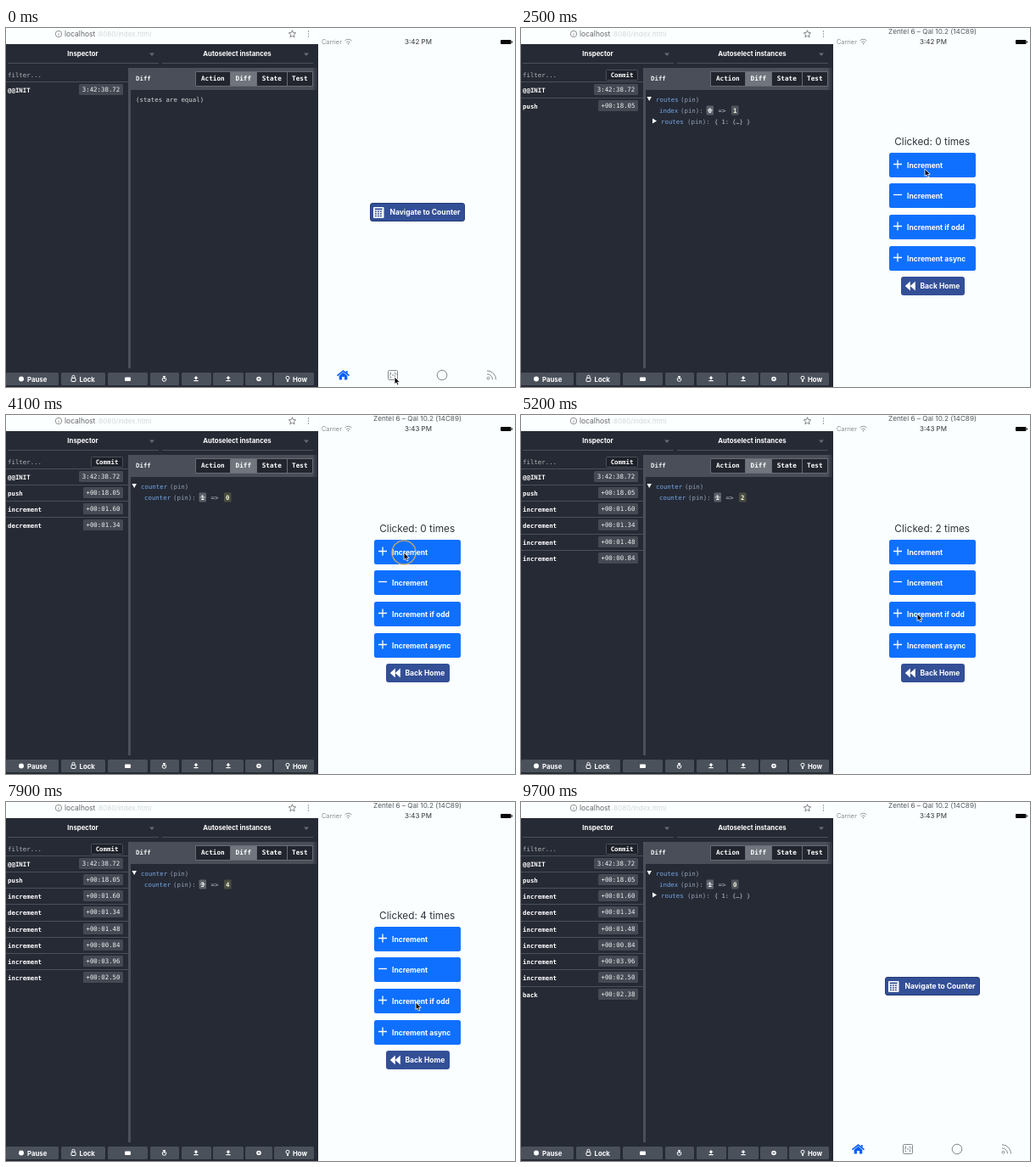
An HTML page for the animation above (9800 ms loop, 600 by 423 pixels).

```html
<!DOCTYPE html>
<html lang="en">
<head>
<meta charset="utf-8">
<title>Counter demo</title>
<style>
html, body { margin: 0; width: 100%; height: 100%; overflow: hidden; background: #fafeff; }
svg { display: block; width: 600px; height: 423px; }
text { white-space: pre; }
.mono { font-family: "DejaVu Sans Mono", monospace; font-size: 7.4px; }
.ui { font-family: Inter, sans-serif; font-size: 8px; }
.b { font-weight: 700; }
.s { font-weight: 700; font-size: 7.8px; }
</style>
</head>
<body>
<svg id="stage" viewBox="0 0 600 423"></svg>
<script>
const LOOP = 9800, STEP = 100, SLIDE = 300;
const WHITE = '#fff', DARK = '#262a34', LINE = '#4a4f59', CHIP = '#444953', BLUE = '#0f70ff', NAVY = '#334f96';

// time, label, stamp
const actions = [
  [0, '@@INIT', '3:42:38.72'],
  [2000, 'push', '+00:18.05'],
  [2800, 'increment', '+00:01.60'],
  [3500, 'decrement', '+00:01.34'],
  [4200, 'increment', '+00:01.48'],
  [4600, 'increment', '+00:00.84'],
  [6600, 'increment', '+00:03.96'],
  [7800, 'increment', '+00:02.50'],
  [9000, 'back', '+00:02.38']
];
const clicks = [1900, 2700, 3400, 4100, 4500, 5300, 6100, 7700, 8900];
const path = [
  [0, 458, 411], [300, 458, 411], [900, 398, 408], [1300, 398, 408], [1500, 406, 400],
  [1850, 480, 216], [2000, 480, 216], [2400, 476, 166], [2800, 476, 166],
  [3300, 468, 197], [3500, 468, 197], [3900, 469, 162], [4700, 469, 162],
  [5100, 467, 234], [5500, 467, 234], [5950, 480, 270], [6800, 480, 270],
  [7400, 483, 236], [8100, 483, 236], [8700, 484, 303], [9050, 484, 303], [9600, 470, 430]
];

const rect = (x, y, w, h, fill, r = 0, extra = '') =>
  `<rect x="${x}" y="${y}" width="${w}" height="${h}" rx="${r}" fill="${fill}" ${extra}/>`;
const text = (x, y, s, cls, fill = WHITE, extra = '') =>
  `<text x="${x}" y="${y}" class="${cls}" fill="${fill}" ${extra}>${s}</text>`;
const shape = (d, fill, extra = '') => `<path d="${d}" fill="${fill}" ${extra}/>`;
const stroke = (d, color, w = 1) => shape(d, 'none', `stroke="${color}" stroke-width="${w}"`);
const disc = (x, y, r, fill, extra = '') => `<circle cx="${x}" cy="${y}" r="${r}" fill="${fill}" ${extra}/>`;
const MID = 'text-anchor="middle"';

function footer() {
  const spans = [[0, 62], [65, 117], [120, 167], [170, 204], [207, 242], [244, 280], [282, 314], [316, 363]];
  const arrow = x => shape(`M${x} 410l2.6 2.8h-1.7v1.4h-1.8v-1.4h-1.7z`, WHITE) + rect(x - 2.6, 415, 5.2, 1.2, WHITE);
  return spans.map(([a, b]) => rect(a, 406, b - a, 15, '#4a515b', 1.5)).join('') +
    disc(18, 413.5, 3, WHITE) + text(25, 416.5, 'Pause', 'ui s') +
    rect(77, 412.5, 5, 4, 'none', 0.5, 'stroke="#fff"') + stroke('M78 412v-1.2a1.5 1.5 0 0 1 3 0v1.2', WHITE) +
    text(86.5, 416.5, 'Lock', 'ui s') +
    rect(140, 411.5, 7, 4.5, WHITE, 1) +
    disc(186.5, 414, 2.3, 'none', 'stroke="#fff"') + stroke('M185 410.5h3M186.5 410.5v3.5', WHITE) +
    arrow(224) + arrow(262) +
    disc(298, 413.5, 2.8, WHITE) + rect(296.7, 413, 2.6, 1, '#4a515b') +
    disc(332, 412.3, 2, 'none', 'stroke="#fff"') + rect(331, 414.5, 2, 2.5, WHITE) +
    text(338, 416.5, 'How', 'ui s');
}

function inspector() {
  const tabs = [['Action', 223, 264], ['Diff', 264, 295], ['State', 295, 331], ['Test', 331, 361]];
  const select = (x, label) =>
    text(x + 88.5, 33.3, label, 'ui s', WHITE, MID) + rect(x, 41, 178, 1, LINE) +
    shape(`M${x + 167} 29.5h6l-3 3.5z`, '#666b74');
  return '<linearGradient id="fade"><stop stop-color="#494e58"/><stop offset="1" stop-color="#2b2f39"/></linearGradient>' +
    rect(0, 0, 368, 19, '#fbffff') + rect(0, 19, 368, 404, DARK) +
    disc(62, 7, 3.7, 'none', 'stroke="#777" stroke-width=".8"') + rect(61.6, 6.2, 0.8, 2.8, '#888') +
    text(69, 10, 'localhost', 'ui', '#666', 'style="font-size:8.5px"') +
    text(107, 10, ':8080/index.html', 'ui', '#d3d7d9') +
    shape('M337.5 2.7l1.2 2.8 3 .3-2.3 2 .7 3-2.6-1.6-2.6 1.6.7-3-2.3-2 3-.3z', 'none', 'stroke="#555" stroke-width=".7"') +
    [4, 7, 10].map(y => disc(356.5, y, 0.7, '#777')).join('') +
    select(2, 'Inspector') + select(184, 'Autoselect instances') +
    text(2, 57.5, 'filter...', 'mono', '#b2b5b9') + rect(0, 63, 144, 1, LINE) +
    rect(147, 47, 214, 26, '#494e58') + rect(361, 47, 6, 26, 'url(#fade)') + rect(144, 47, 3, 354, LINE) +
    text(153, 62, 'Diff', 'mono b', '#f2f3f4') +
    rect(223, 51, 139, 18, '#666b74', 1) +
    tabs.map(([s, a, b]) =>
      rect(a + 1, 52, b - a - 1, 16, s === 'Diff' ? '#70757e' : '#22252e') +
      text((a + b) / 2 + 0.3, 62.3, s, 'mono b', WHITE, MID + ' style="font-size:7.7px"')).join('') +
    footer();
}

function history(t) {
  const shown = actions.filter(a => a[0] <= t);
  const commit = shown.length > 1
    ? rect(100.5, 49.5, 37, 12, '#1e2129', 1, 'stroke="#4a4f59"') + text(119, 58, 'Commit', 'mono b', WHITE, MID)
    : '';
  return commit + shown.map(([, name, stamp], i) => {
    const y = Math.round(72.6 + i * 19.25), x = i ? 91 : 86;
    return (i ? rect(0, y - 10, 144, 1, '#4a4f59') : '') +
      text(2, y + 2.7, name, 'mono b') +
      rect(x, y - 7, 138 - x, 13, CHIP, 1.5) + text((x + 138) / 2, y + 2.2, stamp, 'mono', '#f0f1f2', MID);
  }).join('');
}

// shown value after each number of logged actions
const counts = [0, 0, 0, 1, 0, 1, 2, 3, 4, 4];
const logged = t => actions.filter(a => a[0] <= t).length;

function change(x, y, from, to, hue) {
  return rect(x, y - 8, 8.5, 11, '#5b5f67', 1) + text(x + 4.2, y, from, 'mono b', WHITE, MID) +
    rect(x + 1, y - 3, 6.5, 0.8, '#d8dadc') +
    text(x + 14, y, '=&gt;', 'mono', '#c3c6ca') +
    rect(x + 29.5, y - 8, 8.5, 11, hue, 1) + text(x + 33.7, y, to, 'mono b', '#f4f6dc', MID);
}

function diff(t) {
  const n = logged(t), KEY = '#74a5e4', PIN = '#93a1b8';
  if (n === 1) return text(153, 87, '(states are equal)', 'mono', '#d0d2d5');
  const open = shape('M148.5 81h5.4l-2.7 5z', WHITE);
  if (n === 2 || n === 9) {
    const back = n === 9;
    return open + text(159, 86.5, 'routes', 'mono', KEY) + text(188, 86.5, '(pin)', 'mono', PIN) +
      text(163, 99.5, 'index', 'mono', KEY) + text(188, 99.5, '(pin):', 'mono', PIN) +
      change(218.5, 99.5, +back, +!back, '#50545c') +
      shape('M155 106.5v6l5-3z', WHITE) + text(165, 112.5, 'routes', 'mono', KEY) +
      text(196, 112.5, '(pin):', 'mono', PIN) + text(228, 112.5, '{ 1: {…} }', 'mono', '#c3c6ca', 'style="font-size:7px"');
  }
  return open + text(159, 86.5, 'counter', 'mono', KEY) + text(193, 86.5, '(pin)', 'mono', PIN) +
    text(163, 99.5, 'counter', 'mono', KEY) + text(197, 99.5, '(pin):', 'mono', PIN) +
    change(227.5, 99.5, counts[n - 1], counts[n], '#4a4d40');
}

const LABEL = 'style="font-size:8.5px"';

function home() {
  const keys = [0, 1, 2].flatMap(r => [0, 1, 2].map(c => rect(434.8 + c * 3, 215.5 + r * 2.6, 2, 1.6, NAVY))).join('');
  const G = '#85898e';
  return rect(429.5, 206.5, 111, 21, NAVY, 2.5, 'stroke="#263d7a"') +
    rect(433, 211, 12.5, 13, WHITE, 1) + rect(434.6, 212.5, 9, 1.8, NAVY) + keys +
    text(452.5, 220.2, 'Navigate to Counter', 'ui s', WHITE, LABEL) +
    stroke('M390.5 409.7l7-5.7 7 5.7', '#0a5fff', 1.7) +
    shape('M392.7 409.7l4.8-3.9 4.8 3.9v4.8h-3.3v-3.5h-3v3.5h-3.3zM400.8 404h1.8v3.5l-1.8-1.5z', '#0a5fff') +
    rect(450.5, 403.5, 11, 11, 'none', 1, `stroke="${G}"`) +
    stroke('M453.5 405.5v3M453.5 410.5v2M458.5 405.5v2M458.5 409.5v3M455 409h2.5M452 409h1M459 408h1.5', G) +
    disc(514, 409, 5.8, 'none', `stroke="${G}"`) +
    stroke('M567 403.8a10.5 10.5 0 0 1 10.5 10.5M567 407.8a6.5 6.5 0 0 1 6.5 6.5', G) + disc(568.5, 412.7, 1.4, 'none', `stroke="${G}"`);
}

function counter(n) {
  const rows = ['Increment', 'Increment', 'Increment if odd', 'Increment async'];
  return rect(368, 22, 232, 401, '#fafeff') +
    text(484.7, 137.6, `Clicked: ${n} times`, 'ui', '#30343a', MID + ' style="font-size:11.8px"') +
    rows.map((s, i) => {
      const y = Math.floor(147 + i * 36.7), m = y + 13.5;
      return rect(434, y, 102, 29, BLUE, 2.5) +
        stroke(`M439 ${m}h10` + (i === 1 ? '' : `M444 ${m - 5}v10`), WHITE, 1.3) +
        text(455, m + 4.1, s, 'ui s', WHITE, LABEL);
    }).join('') +
    rect(448, 293, 75, 22, NAVY, 3) +
    shape('M458.8 298.5v11l-6-5.5zM464.8 298.5v11l-6-5.5z', WHITE) +
    text(470.5, 307.3, 'Back Home', 'ui s', WHITE, LABEL);
}

function phone(t) {
  const out = x => 1 - (1 - Math.min(1, Math.max(0, x))) ** 3;
  const shift = 232 * (1 - out((t - 1900) / SLIDE) + out((t - 8900) / SLIDE));
  return home() + (shift < 231.9 ? `<g transform="translate(${shift.toFixed(2)})">${counter(counts[logged(t)])}</g>` : '');
}

function statusBar(t) {
  return (t >= STEP ? text(485, 7, 'Zentel 6 – Qal 10.2 (14C89)', 'ui', '#555a5e', MID + ' style="font-size:8.2px"') : '') +
    text(372, 19, 'Carrier', 'ui', '#888', 'style="font-size:7.3px"') +
    stroke('M399.5 15a5.5 5.5 0 0 1 8 0M401.2 17a3.3 3.3 0 0 1 4.6 0', '#888', 0.9) + disc(403.5, 18.6, 0.8, '#888') +
    text(486, 19, t < 3600 ? '3:42 PM' : '3:43 PM', 'ui', '#333', MID) +
    rect(583, 14, 12.5, 5, '#080808', 1) + rect(596, 15.5, 1, 2, '#080808');
}

function pointer(t) {
  const i = path.findIndex(p => p[0] > t);
  if (i < 0) return '';
  const [a, ax, ay] = path[i - 1], [b, bx, by] = path[i];
  const u = (t - a) / (b - a), k = u * u * (3 - 2 * u);
  const x = ax + (bx - ax) * k, y = ay + (by - ay) * k;
  const hit = clicks.some(c => t >= c && t < c + 200);
  return (hit ? disc(x, y, 14, 'none', 'stroke="#d8b25c" stroke-width="1.6" stroke-dasharray="2 .6"') : '') +
    `<g transform="translate(${x.toFixed(2)} ${y.toFixed(2)})">` +
    shape('M0 0v8.6l2-1.7 1.4 3.1 1.6-.7-1.4-3h2.7z', '#0a0a0a', 'stroke="#fff" stroke-width=".8"') + '</g>';
}

const stage = document.getElementById('stage');
stage.innerHTML = inspector() + '<g id="log"></g><g id="phone"></g>';
const log = document.getElementById('log'), screen = document.getElementById('phone');
let last = -1;

function draw(now) {
  const t = Math.floor((now % LOOP) / STEP) * STEP;
  if (t !== last) {
    last = t;
    log.innerHTML = history(t) + diff(t);
    screen.innerHTML = rect(368, 0, 232, 423, '#fafeff') + phone(t) + statusBar(t) + pointer(t);
  }
  requestAnimationFrame(draw);
}
draw(performance.now());
</script>
</body>
</html>
```
